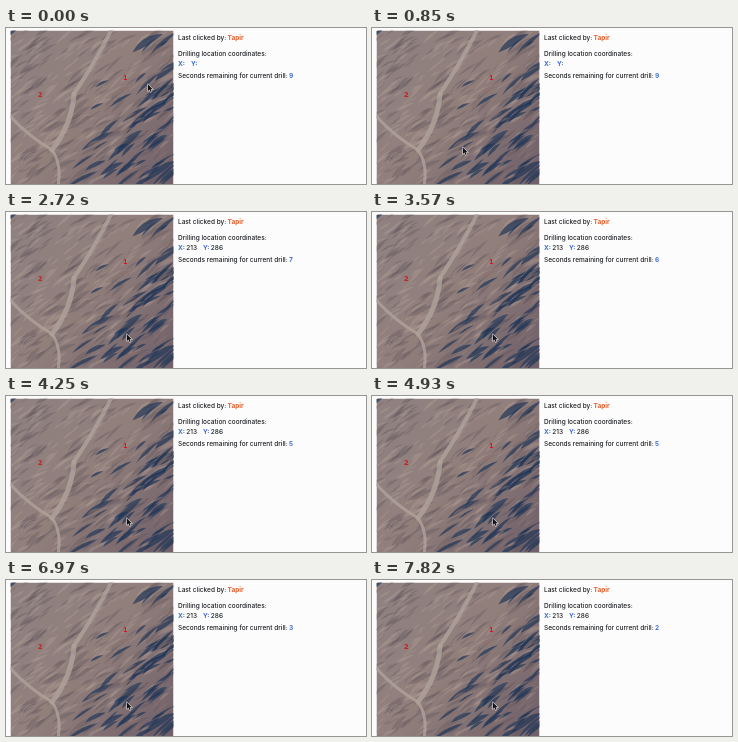
An HTML page with a canvas for the animation above (7.99 s loop, 360 px wide and 156 px high).

```html
<!DOCTYPE html>
<html lang="en">
<head>
<meta charset="utf-8">
<title>Drilling map</title>
<style>
  html, body { margin: 0; width: 100%; height: 100%; overflow: hidden; background: #fcfcfc; }
  canvas { position: absolute; left: 0; top: 0; width: 360px; height: 156px; }
  p {
    position: absolute; left: 172px; margin: 0; white-space: pre; color: #1c1e22;
    font: 450 6.5px/10px Inter, "Liberation Sans", sans-serif;
  }
  b { font-weight: 700; color: #3d6cd0; }
  .value { margin-left: 1.3px; }
  .who { color: #e4602f; }
  .pin { font: bold 6.5px/10px "DejaVu Sans", sans-serif; color: #d8141c; }
</style>
</head>
<body>
<canvas id="land"></canvas>
<p class="pin" style="left:117px;top:44.5px">1</p>
<p class="pin" style="left:32px;top:62px">2</p>
<p style="top:4.5px">Last clicked by:<b class="value who">Tapir</b></p>
<p style="top:21px">Drilling location coordinates:</p>
<p style="top:30.5px"><b>X:</b><span class="value" id="x"></span></p>
<p style="top:30.5px" id="yBox"><b>Y:</b><span class="value" id="y"></span></p>
<p style="top:43px">Seconds remaining for current drill:<b class="value" id="left"></b></p>
<canvas id="pointer"></canvas>
<script>
const LOOP = 7990, STEP = 170, CLICK = 1190, TICK = 1020, SWEEP = 850;
const MAP = { x: 4.5, y: 2.5, w: 163, h: 154 };
const $ = id => document.getElementById(id);
const clamp = u => Math.max(0, Math.min(1, u));
const lerp = (a, b, u) => a + (b - a) * u;
const ease = u => u * u * (3 - 2 * u);

function context(id) {
  const c = $(id), ratio = window.devicePixelRatio || 1;
  c.width = 360 * ratio;
  c.height = 156 * ratio;
  const g = c.getContext('2d');
  g.scale(ratio, ratio);
  return g;
}

const land = context('land'), pointer = context('pointer');

function random(seed) {
  return () => (seed = (seed * 16807) % 2147483647) / 2147483647;
}

// Slivers rising to the right; density(x, y) is the chance that one is drawn.
function slivers(count, size, color, density, seed) {
  const rnd = random(seed);
  land.fillStyle = color;
  for (let i = 0; i < count; i++) {
    const x = MAP.x + rnd() * MAP.w, y = MAP.y + rnd() * MAP.h;
    const len = size * (0.6 + rnd()), bend = len * (0.08 + rnd() * 0.12);
    const tilt = -0.62 + (rnd() - 0.5) * 0.4;
    if (rnd() > density(x, y)) continue;
    land.save();
    land.translate(x, y);
    land.rotate(tilt);
    land.beginPath();
    land.moveTo(-len / 2, 0);
    land.quadraticCurveTo(0, -bend * 1.6, len / 2, 0);
    land.quadraticCurveTo(0, bend * 0.4, -len / 2, 0);
    land.fill();
    land.restore();
  }
}

function stream(width, x1, y1, cx, cy, x2, y2) {
  land.lineWidth = width;
  land.beginPath();
  land.moveTo(x1, y1);
  land.quadraticCurveTo(cx, cy, x2, y2);
  land.stroke();
}

function drawLand() {
  land.beginPath();
  land.rect(MAP.x, MAP.y, MAP.w, MAP.h);
  land.clip();

  const base = land.createLinearGradient(20, 20, 168, 140);
  base.addColorStop(0, '#8f8180');
  base.addColorStop(0.45, '#917f7b');
  base.addColorStop(1, '#70616a');
  land.fillStyle = base;
  land.fillRect(MAP.x, MAP.y, MAP.w, MAP.h);

  const shadow = (x, y) => Math.max(clamp((x + 0.55 * y - 125) / 75), clamp(1 - (x * 0.5 + y) / 36));
  const open = (x, y) => 1 - shadow(x, y) * 0.6;
  slivers(240, 17, 'rgba(94,82,92,.34)', open, 17);
  slivers(200, 15, 'rgba(178,158,149,.36)', open, 53);

  land.strokeStyle = 'rgba(176,163,155,.8)';
  land.lineCap = 'round';
  stream(4, 106, 0, 94, 26, 68, 66);
  stream(5, 68, 66, 66, 96, 46, 122);
  stream(3, 4, 88, 22, 108, 46, 122);
  stream(3, 46, 122, 56, 136, 52, 158);

  slivers(170, 24, 'rgba(33,55,88,.7)', shadow, 61);
  slivers(110, 15, 'rgba(136,112,108,.6)', shadow, 29);
}

function pointerAt(t) {
  const away = ease(clamp(t / SWEEP)), back = ease(clamp((t - SWEEP) / (CLICK - SWEEP)));
  return [
    lerp(142, 91, away) + 30 * back,
    lerp(56.5, 119.5, away) + 3 * back
  ];
}

function drawPointer([x, y]) {
  const g = pointer, arrow = new Path2D('M0 0V6.4L1.5 5.1L2.5 7.4L3.6 6.9L2.6 4.7H4.6Z');
  g.clearRect(0, 0, 360, 156);
  g.save();
  g.translate(x, y);
  g.lineWidth = 1.1;
  g.strokeStyle = '#e0dee0';
  g.stroke(arrow);
  g.fillStyle = '#101114';
  g.fill(arrow);
  g.restore();
}

function frame(now) {
  const t = Math.floor((now % LOOP) / STEP) * STEP;
  const clicked = t >= CLICK;
  $('x').textContent = clicked ? '213' : '';
  $('y').textContent = clicked ? '286' : '';
  $('yBox').style.left = clicked ? '197px' : '185px';
  $('left').textContent = 8 - Math.floor((t - CLICK) / TICK) - (clicked ? 0 : Math.floor(-(t - CLICK - 1) / TICK) ? 1 : 0);
  drawPointer(pointerAt(t));
  requestAnimationFrame(frame);
}

drawLand();
requestAnimationFrame(frame);
</script>
</body>
</html>
```
